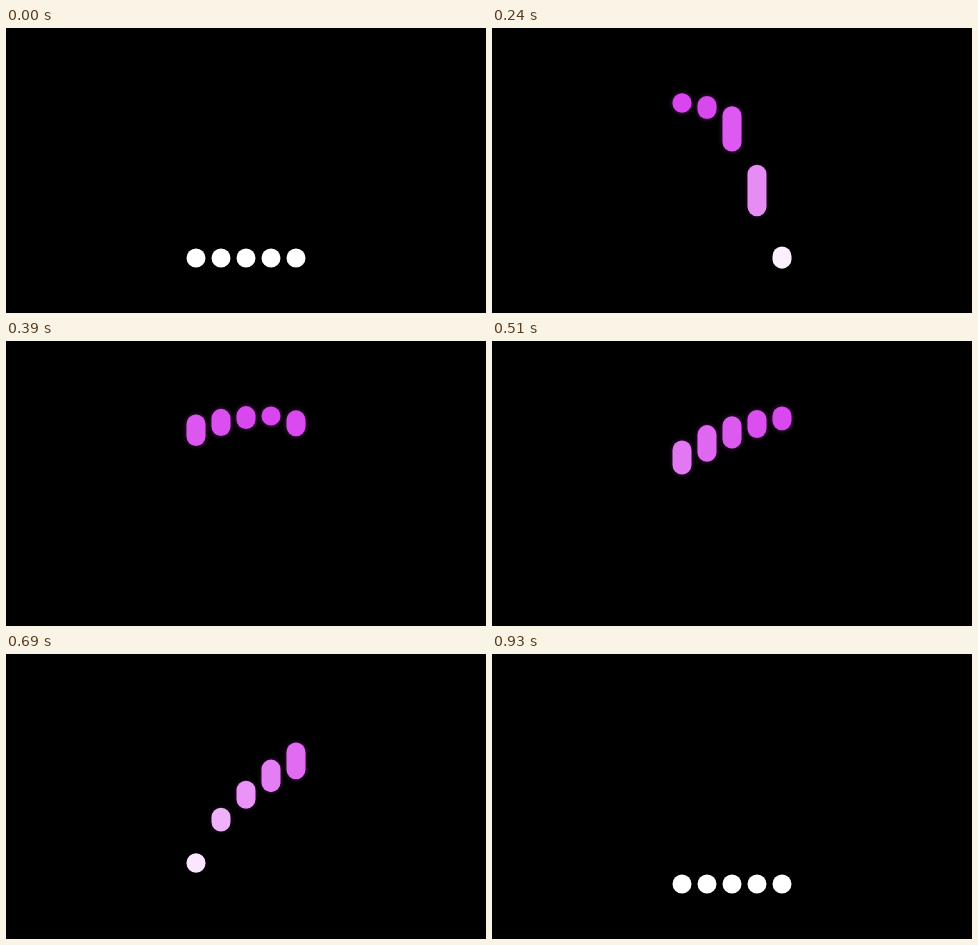
These frames come from a looping animation (480x285 px, 1.38 s). An HTML page with a canvas:

```html
<!DOCTYPE html>
<html lang="en">
<head>
<meta charset="utf-8">
<title>Bouncing dots</title>
<style>
html, body { margin: 0; height: 100%; overflow: hidden; background: #000; }
canvas { display: block; }
</style>
</head>
<body>
<canvas id="stage" width="480" height="285"></canvas>
<script>
const ctx = document.getElementById('stage').getContext('2d');
const LOOP = 1380, STEP = 30, STAGGER = 54;
const RISE = 18, TURN = 234, FALL = 463;
const FLOOR = 230, LIFT = 155, SIZE = 19;

const clamp = x => Math.min(1, Math.max(0, x));

function bezier(x1, y1, x2, y2) {
  const at = (a, b, s) => 3 * (1 - s) ** 2 * s * a + 3 * (1 - s) * s * s * b + s ** 3;
  return x => {
    if (x <= 0 || x >= 1) return clamp(x);
    let lo = 0, hi = 1;
    for (let i = 0; i < 30; i++) {
      const mid = (lo + hi) / 2;
      if (at(x1, x2, mid) < x) lo = mid; else hi = mid;
    }
    return at(y1, y2, lo);
  };
}

const rise = bezier(0.3, 0, 0.18, 1);
const fall = bezier(0.42, 0, 1, 0.53);

// Height above the floor, stretch in pixels and tint for a dot's own time
function pose(t) {
  if (t < TURN) {
    const x = clamp((t - RISE) / (TURN - RISE));
    const peak = 105;
    const stretch = t < peak
      ? clamp((t - RISE) / (peak - RISE))
      : (1 - (t - peak) / (TURN - peak)) ** 2.5;
    return { up: rise(x), stretch: 47 * stretch, tint: 1 - (1 - x) ** 3 };
  }
  const x = clamp((t - TURN) / FALL);
  const up = 1 - fall(x);
  return { up, stretch: 18.5 * (1 - Math.abs(2 * x - 1)), tint: up };
}

function drawDot(i, t) {
  const { up, stretch, tint } = pose(t - i * STAGGER);
  const h = SIZE + stretch;
  const mix = c => Math.round(255 + (c - 255) * tint);
  ctx.fillStyle = `rgb(${mix(217)}, ${mix(70)}, ${mix(239)})`;
  ctx.shadowColor = `rgba(217, 70, 239, ${0.45 * up})`;
  ctx.shadowBlur = 5;
  ctx.beginPath();
  ctx.roundRect(190 + 25 * i - SIZE / 2, FLOOR - LIFT * up - h / 2, SIZE, h, SIZE / 2);
  ctx.fill();
}

function draw(now) {
  const t = Math.floor((now % LOOP) / STEP) * STEP;
  ctx.shadowColor = 'transparent';
  ctx.fillStyle = '#000';
  ctx.fillRect(0, 0, 480, 285);
  for (let i = 0; i < 5; i++) drawDot(i, t);
}

let start;
function tick(now) {
  start ??= now;
  draw(now - start);
  requestAnimationFrame(tick);
}
draw(0);
requestAnimationFrame(tick);
</script>
</body>
</html>
```
